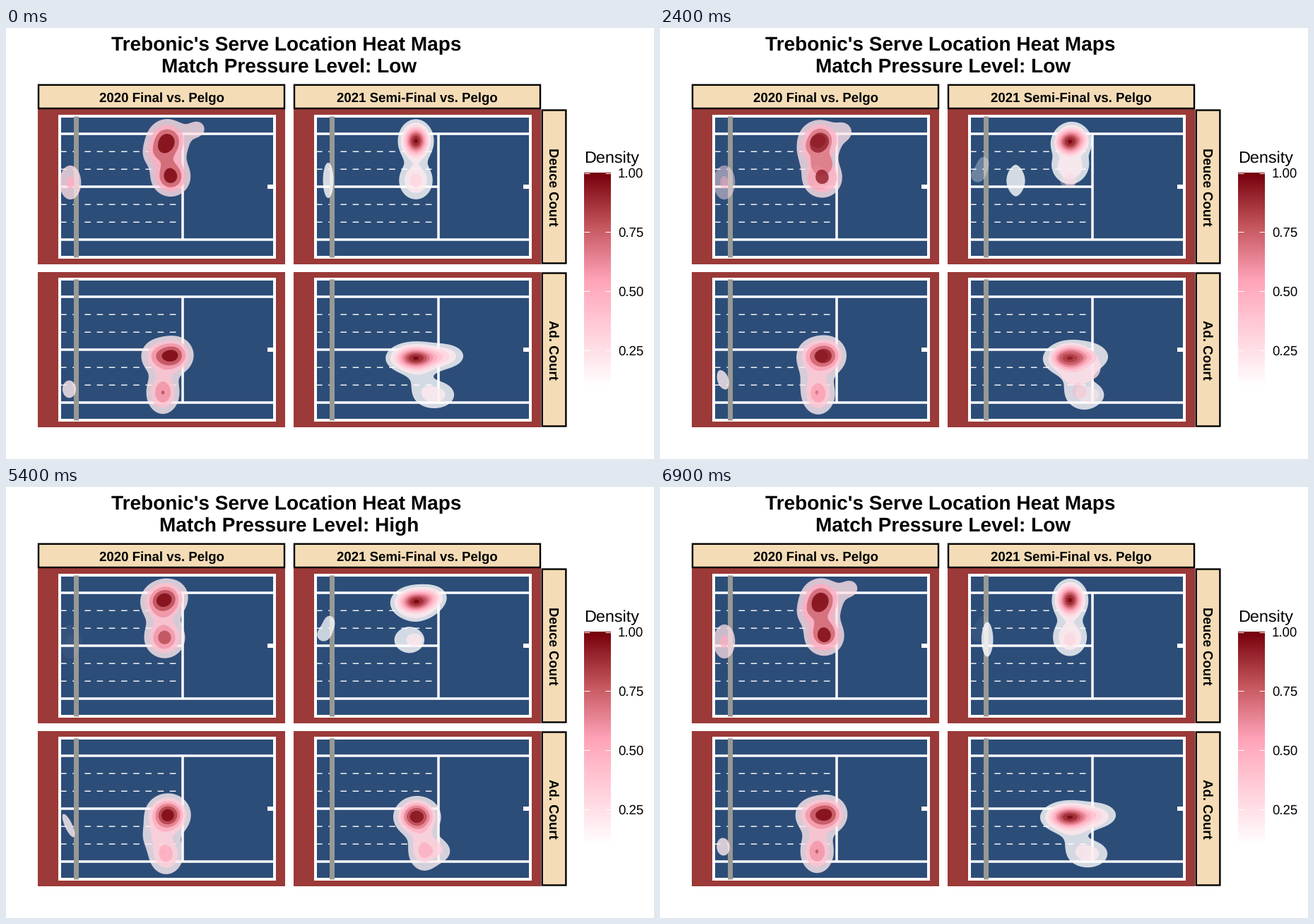
These frames come from a looping animation (917 px wide and 611 px high, 7 s). A matplotlib script:

```python
from itertools import zip_longest

import numpy as np
import matplotlib.pyplot as plt
from matplotlib.animation import FuncAnimation
from matplotlib.colors import LinearSegmentedColormap
from matplotlib.patches import Polygon, Rectangle

W, H, DPI = 917, 611, 64
PT = 72 / DPI  # points per pixel
N = 120        # vertices per contour
ALPHA = 0.8
DX, DY = 362, 231  # offsets between facets
CLAY, COURT, NET, WHEAT = "#9b3a38", "#2c4d78", "#989994", "#f4dcb6"

plt.rcParams.update({"font.family": "Liberation Sans", "text.hinting": "none",
                     "lines.scale_dashes": False,
                     "lines.solid_capstyle": "butt"})
DENSITY = LinearSegmentedColormap.from_list("density", [
    (0, "#ffffff"), (0.5, "#ffa3b8"), (0.75, "#c5565e"), (1, "#76000b")], 512)

fig = plt.figure(figsize=(W / DPI, H / DPI), dpi=DPI, facecolor="white")
ax = fig.add_axes([0, 0, 1, 1])
XS, YS = np.meshgrid(np.arange(60, 680, 2), np.arange(110, 570, 2))


# ---------- density surfaces ----------
def hump(x, y, sx, sy, height, tilt=0):
    """Gaussian bump over the stage, in pixels."""
    c, s = np.cos(np.radians(tilt)), np.sin(np.radians(tilt))
    u, v = XS - x, YS - y
    return height * np.exp(-0.5 * (((u * c + v * s) / sx) ** 2
                                   + ((v * c - u * s) / sy) ** 2))


# Each facet: (number of levels, surface) at low and at high pressure.
DEUCE_FINAL = (
    (4, hump(228, 161, 17, 18, 1.2) + hump(233, 211, 16, 16, 1.16)
     + hump(208, 180, 12, 12, 0.3) + hump(271, 143, 12, 12, 0.34)
     + hump(91, 219, 12, 19, 0.56)),
    (5, hump(213, 163, 15, 16, 0.62) + hump(231, 158, 15, 16, 0.8)
     + hump(224, 214, 16.5, 16.5, 0.93)))
DEUCE_SEMI = (
    (10, hump(580, 160, 11.8, 14.2, 1.03) + hump(580, 216, 15, 17, 0.35)
     + hump(456, 216, 8.3, 28, 0.15)),
    (10, hump(579, 163, 17, 11, 0.99) + hump(604, 155, 13, 9.5, 0.3)
     + hump(578, 217, 16, 13, 0.26)
     + hump(458, 191, 9, 11, 0.13) + hump(449, 210, 10, 10, 0.14)))
AD_FINAL = (
    (5, hump(239, 464, 15, 15, 0.95) + hump(214, 465, 15, 15, 0.6)
     + hump(222, 517, 14, 18, 0.81) + hump(89.5, 512, 12.3, 16, 0.27)),
    (6, hump(229, 465, 16.5, 15.7, 1.15) + hump(227, 521, 15, 17.5, 0.6)
     + hump(204, 495, 12, 14, 0.2) + hump(88.5, 478, 6.7, 25, 0.22, -25)))
AD_SEMI = (
    (10, hump(579, 468, 19.5, 11, 1) + hump(621, 465, 18, 11, 0.28)
     + hump(606, 520, 20, 13.5, 0.27) + hump(583, 497, 14, 13, 0.09)),
    (6, hump(581, 467, 16.5, 15, 1.15) + hump(591, 516, 14, 18, 0.56)
     + hump(617, 516, 12, 12, 0.25)))


# ---------- contour bands ----------
def signed_area(curve):
    x, y = curve.T
    return np.sum(x * np.roll(y, -1) - y * np.roll(x, -1)) / 2


def resample(curve):
    """Spread N points evenly along a closed curve, always one way round."""
    if signed_area(curve) < 0:
        curve = curve[::-1]
    s = np.r_[0, np.cumsum(np.hypot(*np.diff(curve, axis=0).T))]
    u = np.linspace(0, s[-1], N, endpoint=False)
    return np.column_stack([np.interp(u, s, curve[:, i]) for i in (0, 1)])


def bands(count, surface):
    """For each level, its outlines from largest to smallest."""
    lines = ax.contour(XS, YS, surface, np.arange(1, count + 1) / count)
    levels = [sorted((resample(seg) for seg in segs if len(seg) > 4),
                     key=signed_area, reverse=True) for segs in lines.allsegs]
    lines.remove()
    return levels


def align(low, high):
    a, b = low - low.mean(0), high - high.mean(0)
    shift = min(range(N), key=lambda s: ((a - np.roll(b, s, 0)) ** 2).sum())
    return np.roll(high, shift, 0)


class Band:
    """One filled outline; a missing end state makes it fade."""

    def __init__(self, low, high, low_level, high_level):
        self.fade_in, self.fade_out = low is None, high is None
        if self.fade_in:
            low, low_level = high, high_level
        if self.fade_out:
            high, high_level = low, low_level
        self.low, self.high = low, align(low, high)
        self.levels = low_level, high_level
        self.patch = ax.add_patch(Polygon(low, closed=True, lw=0, zorder=5))

    def pose(self, p):
        shown = p if self.fade_in else 1 - p if self.fade_out else 1
        level = self.levels[0] + (self.levels[1] - self.levels[0]) * p
        self.patch.set_xy(self.low + (self.high - self.low) * p)
        self.patch.set_facecolor((*DENSITY((level - 0.1) / 0.9)[:3],
                                  ALPHA * shown))


def tween(low, high):
    """Pair outlines by rank of level, then by size."""
    pairs = zip_longest(bands(*low), bands(*high), fillvalue=[])
    return [Band(a, b, rank / low[0], rank / high[0])
            for rank, (olds, news) in enumerate(pairs, 1)
            for a, b in zip_longest(olds, news)]


# ---------- fixed scene ----------
def box(x0, y0, x1, y1, fill, edge="none", lw=0, **kw):
    ax.add_patch(Rectangle((x0, y0), x1 - x0, y1 - y0, facecolor=fill,
                           edgecolor=edge, lw=lw * PT, zorder=1, **kw))


def line(x0, y0, x1, y1, lw, color="white", **kw):
    ax.plot([x0, x1], [y0, y1], color=color, lw=lw * PT, zorder=2, **kw)


def label(x, y, text, size, **kw):
    return ax.text(x, y, text, fontsize=size * PT, color="black", zorder=8,
                   va="baseline", **kw)


def strip(*corners):
    box(*corners, WHEAT, "black", 2.4, snap=False)


def court(dx, dy):
    box(45 + dx, 115 + dy, 395 + dx, 334.5 + dy, CLAY)
    box(75.5 + dx, 125 + dy, 380 + dx, 325 + dy, COURT, "white", 4)
    for y in (150, 300):
        line(74 + dx, y + dy, 382 + dx, y + dy, 3.5)
    line(77 + dx, 225 + dy, 250 + dx, 225 + dy, 3.5)
    line(250 + dx, 150 + dy, 250 + dx, 300 + dy, 3.5)
    line(370 + dx, 225 + dy, 380 + dx, 225 + dy, 6)
    for offset in (-50, -25, 25, 50):
        y = 225.2 + offset + dy
        line(77 + dx, y, 250 + dx, y, 1.4, snap=False,
             ls=(0, (8.6 * PT, 8.6 * PT)))
    line(99 + dx, 125 + dy, 99 + dx, 325 + dy, 7, NET)


for dx, text in ((0, "2020 Final vs. Pelgo"), (DX, "2021 Semi-Final vs. Pelgo")):
    for dy in (0, DY):
        court(dx, dy)
    strip(46 + dx, 80.7, 394 + dx, 114)
    label(220 + dx, 104.5, text, 18.67, weight="bold", ha="center")
for dy, text in ((0, "Deuce Court"), (DY, "Ad. Court")):
    strip(758.7, 116.5 + dy, 792.4, 333.5 + dy)
    label(768, 225.5 + dy, text, 18.67, weight="bold", ha="center",
          rotation=270, rotation_mode="anchor")

label(396.5, 32, "Trebonic's Serve Location Heat Maps", 28, weight="bold",
      ha="center")
pressure = label(400.5, 63, "", 28, weight="bold", ha="center")

label(818, 191, "Density", 23.33)
ax.imshow(np.linspace(1, 0, 303)[:, None], cmap=DENSITY, vmin=0, vmax=1,
          extent=(818, 855.5, 508, 205), aspect="auto", zorder=1)
for i in range(4):
    y = 205.5 + 83.8 * i
    line(818, y, 825.5, y, 1)
    line(848, y, 855.5, y, 1)
    label(866, y + 6.8, f"{1 - i / 4:.2f}", 18.67)

heat = [band for facet in (DEUCE_FINAL, DEUCE_SEMI, AD_FINAL, AD_SEMI)
        for band in tween(*facet)]

ax.set_xlim(0, W)
ax.set_ylim(H, 0)
ax.axis("off")


# ---------- motion ----------
def update(k):
    p = np.interp(k, [17, 35, 53, 70], [0, 1, 1, 0])
    for band in heat:
        band.pose(p)
    pressure.set_text(f"Match Pressure Level: {'High' if p >= 0.5 else 'Low'}")


anim = FuncAnimation(fig, update, frames=70, interval=100, repeat=True,
                     init_func=lambda: update(0))
plt.show()
```
